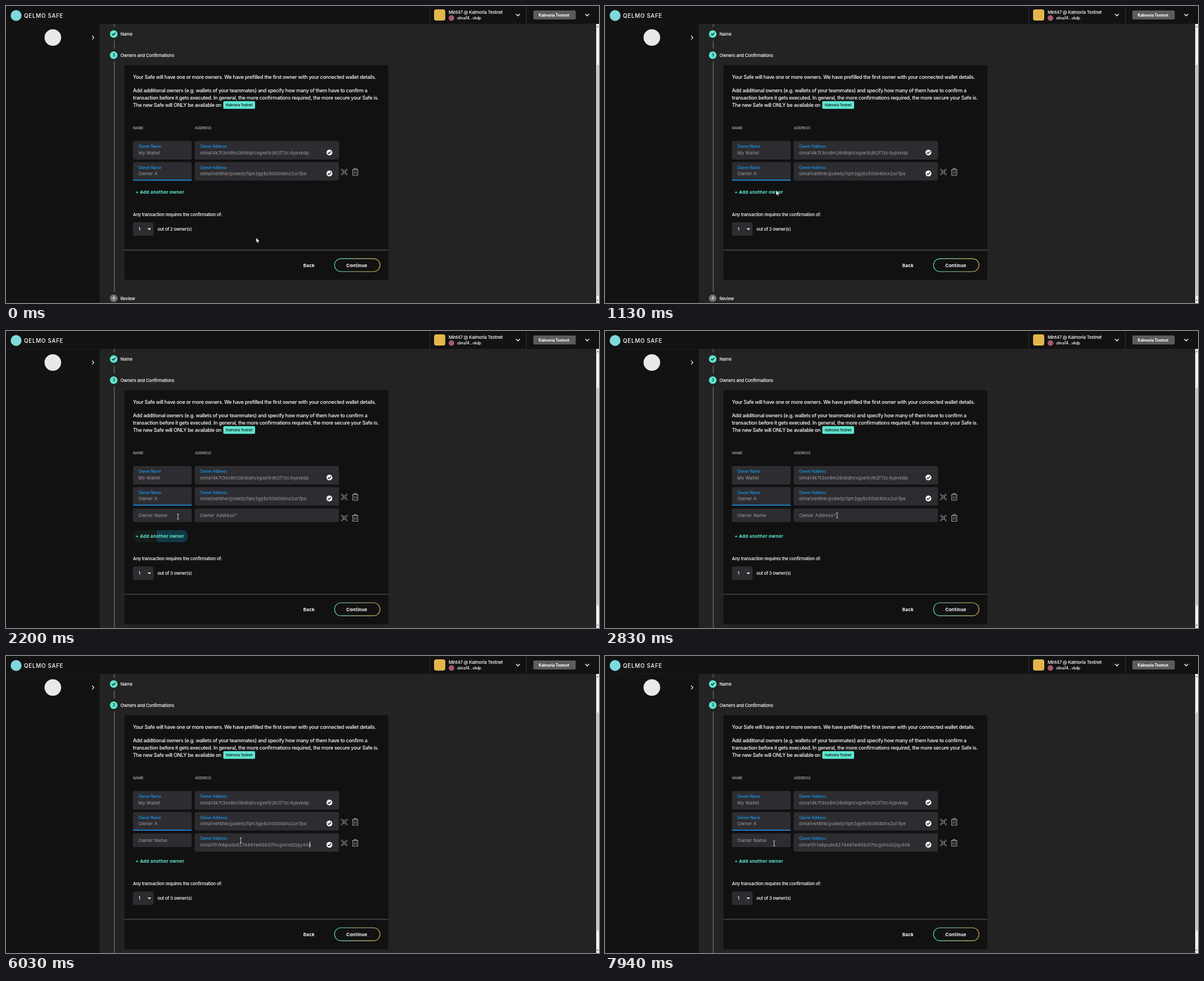
Recreate the animation shown at these times as an HTML page with a canvas. Size 1057 px wide and 530 px high, loop 8 s.

```html
<!DOCTYPE html>
<html lang="en">
<head>
<meta charset="utf-8">
<title>Owners and Confirmations</title>
<style>
  html, body { margin: 0; width: 100%; height: 100%; overflow: hidden; background: #121212; }
  canvas { display: block; }
</style>
</head>
<body>
<canvas id="stage" width="1057" height="530"></canvas>
<script>
const ctx = document.getElementById('stage').getContext('2d');
const LOOP = 8000, STEP = 67;
const TEAL = '#5ee6d0', BLUE = '#149cf3', FIELD = '#2d2d31', DARK = '#121212', GREY = '#a3a3a5';
const NETWORK = 'Kalmoria Testnet';
const ADDRESSES = [
  'olma14k7t3sn8m26ldlqhcvgxe5rj9l2f7zc4ypvkdp',
  'olma1vet6hkrjjsdwtjcfqm3gy8z50ldl4bnx2ur7pe',
  'olma1tfrrk6pudx8274461w95b3l7ncgvhsd2jqy40e'
];

const clamp = v => Math.max(0, Math.min(1, v));
const mix = (a, b, p) => a + (b - a) * p;
const ticks = (t, from) => Math.floor((t - from + 15) / STEP);
const progress = (t, from, count) => clamp((ticks(t, from) + 1) / count);
const easeOut = p => 1 - (1 - p) ** 2;
const easeInOut = p => p * p * (3 - 2 * p);

// cy is the middle of the capitals, track is in em
function text(s, x, cy, size = 8, color = '#fff', weight = 500, track = -0.034) {
  ctx.font = `${weight} ${size}px Inter, sans-serif`;
  ctx.letterSpacing = size * track + 'px';
  ctx.fillStyle = color;
  ctx.fillText(s, x, cy + size * 0.36);
}

function box(x, y, w, h, r, color) {
  ctx.fillStyle = color;
  ctx.beginPath();
  ctx.roundRect(x, y, w, h, r);
  ctx.fill();
}

function disc(x, y, r, color) {
  ctx.fillStyle = color;
  ctx.beginPath();
  ctx.arc(x, y, r, 0, Math.PI * 2);
  ctx.fill();
}

function line(points, color, width = 1) {
  ctx.strokeStyle = color;
  ctx.lineWidth = width;
  ctx.beginPath();
  points.forEach(([x, y]) => ctx.lineTo(x, y));
  ctx.stroke();
}

function triangle(x, y, w, h, color) {
  ctx.fillStyle = color;
  ctx.beginPath();
  ctx.moveTo(x - w, y - h);
  ctx.lineTo(x + w, y - h);
  ctx.lineTo(x, y + h);
  ctx.fill();
}

function tick(x, y, color) {
  line([[x - 2.8, y], [x - 0.9, y + 2], [x + 2.9, y - 2]], color, 1.4);
}

const chevron = (x, y) => line([[x - 3.3, y - 1.7], [x, y + 1.7], [x + 3.3, y - 1.7]], '#fff', 1.4);

function header() {
  box(0, 0, 1057, 32, 0, DARK);
  box(0, 32, 167, 1, 0, '#1d1d1d');
  disc(18, 17, 9.7, '#7fd9dc');
  text('QELMO SAFE', 32, 17, 10, '#fff', 500, 0.06);
  box(755, 0, 1, 32, 0, '#343434');
  box(927, 0, 1, 32, 0, '#343434');
  box(763, 6, 20, 20, 4, '#e3b54c');
  text('Mint47 @ ' + NETWORK, 789, 11.3);
  disc(794, 21.5, 5, '#a9566c');
  text('olma14...vkdp', 804, 21.5, 7);
  chevron(912.5, 16);
  box(940, 8, 75.5, 16, 2, '#5c5c5c');
  text(NETWORK, 949.5, 16.2, 7, '#fff', 700);
  chevron(1036, 16);
}

function sidebar() {
  box(0, 32, 167, 498, 0, DARK);
  disc(83.5, 56.3, 14.8, '#e9e9e9');
  line([[153.5, 53], [156.7, 56.3], [153.5, 59.6]], '#fff', 1.2);
}

function stepper(open) {
  const rail = (a, b) => box(192.5, a, 1, b - a, 0, '#858585');
  rail(32, 38);
  rail(62, 76);
  rail(99, open ? 530 : 510);
  disc(192, 50, 6.8, TEAL);
  tick(192, 50, DARK);
  text('Name', 204, 50);
  disc(192, 87.7, 6.8, TEAL);
  text('3', 189.9, 87.8, 7, DARK);
  text('Owners and Confirmations', 204, 87.7);
  if (open) return;
  disc(192, 521.5, 6.8, '#747474');
  text('4', 189.8, 521.7, 7);
  text('Review', 204, 521.7);
}

function scrollbar(open) {
  box(1052, 32, 5, 498, 0, '#f1f1f1');
  const [top, bottom] = open ? [101, 490] : [105, 517];
  box(1053, top, 3.5, bottom - top, 0, '#c1c1c1');
  triangle(1054.5, 36.5, 1.6, -1.2, '#555');
  triangle(1054.5, 525.5, 1.6, 1.2, '#555');
}

function qrIcon(x, y) {
  for (const sx of [-1, 1]) for (const sy of [-1, 1]) {
    line([[x + sx * 5.2, y + sy * 2.4], [x + sx * 5.2, y + sy * 5], [x + sx * 2.6, y + sy * 5]], '#909090', 1);
    ctx.strokeRect(x + sx * 1.9 - 0.9, y + sy * 1.9 - 0.9, 1.8, 1.8);
  }
}

function trashIcon(x, y) {
  const c = '#a8a8a8';
  line([[x - 5.5, y - 4], [x + 5.5, y - 4]], c, 1.1);
  line([[x - 2, y - 4], [x - 2, y - 6], [x + 2, y - 6], [x + 2, y - 4]], c, 1.1);
  line([[x - 4.5, y - 4], [x - 4.5, y + 6], [x + 4.5, y + 6], [x + 4.5, y - 4]], c, 1.1);
  line([[x - 1.5, y - 1.3], [x - 1.5, y + 3.5]], c, 1);
  line([[x + 1.5, y - 1.3], [x + 1.5, y + 3.5]], c, 1);
}

const fieldText = (s, x, cy, color = GREY) => text(s, x, cy, 8, color, 400, 0.025);

function filledField(x, y, w, label, value) {
  box(x, y, w, 33, 3, FIELD);
  text(label, x + 9.7, y + 9.7, 6.9, BLUE);
  fieldText(value, x + 9.7, y + 20.7);
}

function addressField(y, value) {
  filledField(336.3, y, 257.3, 'Owner Address', value);
  disc(576.5, y + 20.4, 5.2, '#fff');
  tick(576.5, y + 20.4, DARK);
}

function emptyField(x, w, label, color = FIELD) {
  box(x, 316.8, w, 24.2, 3, color);
  fieldText(label, x + 9.7, 328.8);
}

function caret(x, y) {
  box(x, y, 1, 11, 0, '#d8d8d8');
}

function newRow(t) {
  emptyField(226.3, 104.7, 'Owner Name');
  qrIcon(603, 333.7);
  trashIcon(622.5, 333.5);
  if (t < 6030) {
    emptyField(336.3, 257.3, 'Owner Address*', t >= 4420 ? '#313135' : FIELD);
    if ((t >= 4420 && t < 4950) || t >= 5500) caret(346, 323);
    return;
  }
  addressField(316.3, ADDRESSES[2]);
  if (t < 6630 || (t >= 7180 && t < 7720)) caret(541.3, 331);
}

function addButton(t, y) {
  const hover = t >= 2080 ? 1 - clamp((t - 2480) / 250) : 0;
  if (hover > 0) {
    ctx.save();
    ctx.beginPath();
    ctx.roundRect(226.5, y - 10.7, 97, 21.4, 8);
    ctx.clip();
    box(226, y - 11, 98, 22, 0, `rgba(94,230,208,${0.05 * hover})`);
    const k = ticks(t, 2080);
    const radius = k < 2 ? 4 + 4 * k : 38 + 30 * (k - 2);
    disc(306, y - 1, radius, `rgba(0,150,200,${0.23 * (1 - clamp((t - 2300) / 300))})`);
    ctx.restore();
  }
  text('+ Add another owner', 231, y, 8, TEAL, 700, 0.03);
}

function card(t, open) {
  const dy = open ? 34.2 : 0;
  box(211, 105.5, 470.5, 383.5 + dy, 4, '#111');
  const lines = [
    [126.8, 'Your Safe will have one or more owners. We have prefilled the first owner with your connected wallet details.'],
    [150.3, 'Add additional owners (e.g. wallets of your teammates) and specify how many of them have to confirm a'],
    [163.7, 'transaction before it gets executed. In general, the more confirmations required, the more secure your Safe is.'],
    [177.2, 'The new Safe will ONLY be available on']
  ];
  for (const [y, s] of lines) text(s, 226.3, y, 9);
  box(387.3, 169.8, 56.7, 13.6, 2, TEAL);
  text(NETWORK, 392, 176.7, 6.3, '#111');
  text('NAME', 226.3, 218, 6.6, '#b0b0b0');
  text('ADDRESS', 336.7, 218, 6.6, '#b0b0b0');

  ['My Wallet', 'Owner A'].forEach((name, i) => {
    const y = 241 + i * 37.4;
    filledField(226.3, y, 104.7, 'Owner Name', name);
    addressField(y, ADDRESSES[i]);
  });
  box(226.3, 310, 104.7, 1.4, 0, BLUE);
  qrIcon(603, 296.2);
  trashIcon(622.5, 296);
  if (open) newRow(t);

  addButton(t, 332 + dy);
  text('Any transaction requires the confirmation of:', 226.3, 371.8 + dy);
  box(226.3, 386 + dy, 36.7, 24, 3, FIELD);
  text('1', 236.2, 398 + dy);
  triangle(255.5, 398.3 + dy, 3.2, 1.6, '#fff');
  text(`out of ${open ? 3 : 2} owner(s)`, 270, 398.2 + dy);

  box(211, 434.8 + dy, 470.5, 1.6, 0, '#484848');
  text('Back', 530, 462.7 + dy, 8, '#fff', 700, 0.03);
  const edge = ctx.createLinearGradient(585, 0, 667, 0);
  edge.addColorStop(0, TEAL);
  edge.addColorStop(1, '#f0b45a');
  ctx.strokeStyle = edge;
  ctx.lineWidth = 1.2;
  ctx.beginPath();
  ctx.roundRect(585.6, 450.8 + dy, 81, 23.2, 11.6);
  ctx.stroke();
  text('Continue', 606.5, 462.7 + dy, 8, '#fff', 700, 0.03);
}

function arrow(x, y) {
  ctx.beginPath();
  [[0, 0], [0, 8.6], [1.9, 6.9], [3.2, 9.8], [4.6, 9.2], [3.4, 6.4], [6, 6.2]]
    .forEach(([px, py]) => ctx.lineTo(x + px, y + py));
  ctx.closePath();
  ctx.fillStyle = '#fff';
  ctx.fill();
  ctx.strokeStyle = '#111';
  ctx.lineWidth = 0.5;
  ctx.stroke();
}

function beam(x, y) {
  const c = '#c4c4c4';
  line([[x, y - 4.5], [x, y + 4.5]], c, 1);
  for (const s of [-4.5, 4.5]) line([[x - 2, y + s], [x + 2, y + s]], c, 0.9);
}

function pointer(t) {
  const mark = 'rgba(205,190,25,0.78)';
  if (t < 2080) {
    const p = t < 460 ? 0 : easeOut(progress(t, 460, 11));
    if (t >= 1920) disc(305, 330, 6.8, mark);
    arrow(mix(446, 305, p), mix(413.5, 329, p));
    return;
  }
  const go = t < 2430 ? 0 : easeInOut(progress(t, 2430, 8));
  const back = t < 7380 ? 0 : easeInOut(progress(t, 7380, 9));
  if (t >= 4420 && t < 4690) disc(417.5, 328.5, 6.6, mark);
  beam(mix(mix(306.5, 418.5, go), 301.5, back), mix(mix(331, 329, go), 334.5, back));
}

function draw(t) {
  const open = t >= 2200;
  box(0, 0, 1057, 530, 0, '#232323');
  stepper(open);
  card(t, open);
  sidebar();
  header();
  scrollbar(open);
  pointer(t);
}

const start = performance.now();
function frame() {
  draw((performance.now() - start) % LOOP);
  requestAnimationFrame(frame);
}
frame();
</script>
</body>
</html>
```
